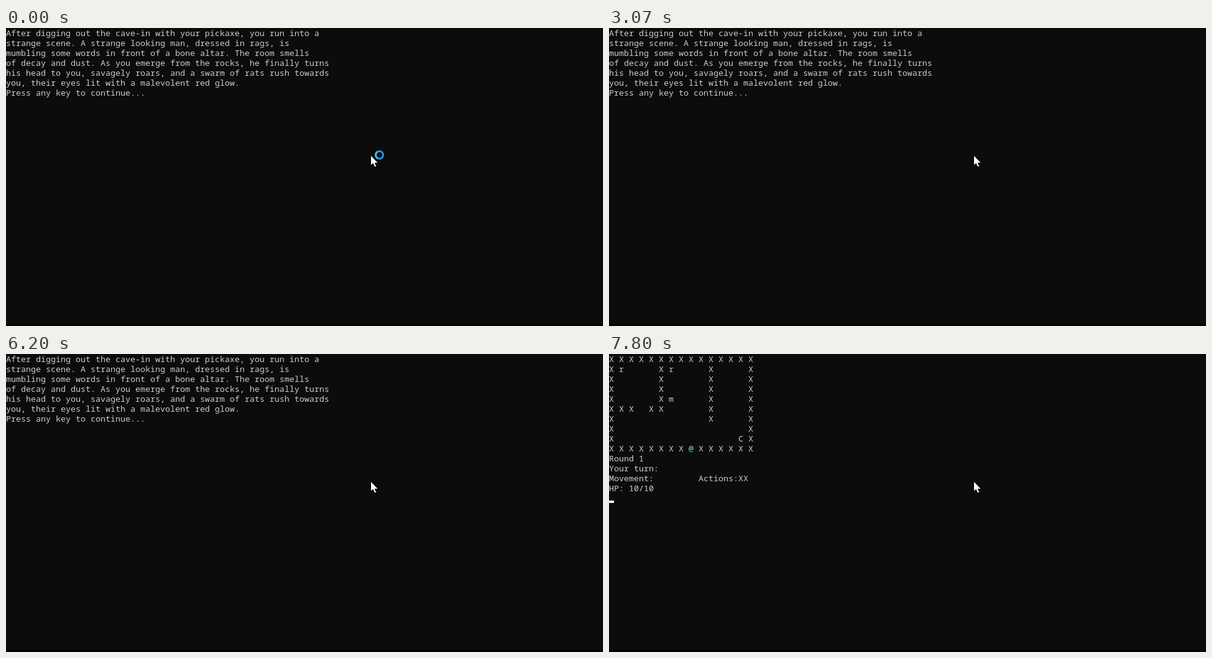
Animation of 960x480 px, one loop 8 s. Source, as an HTML page:

```html
<!DOCTYPE html>
<html lang="en">
<head>
<meta charset="utf-8">
<style>
  html, body { margin: 0; width: 100%; height: 100%; overflow: hidden; background: #0c0c0c; }
  pre {
    position: absolute; left: 0; top: 0; margin: 0; color: #ccc;
    font: 13.3333px/16px "Noto Sans Mono", "Liberation Mono", monospace;
    font-variant-ligatures: none;
  }
  .rat { color: #dcbf7c; }
  .hero { color: #7fdce0; }
  #caret { position: absolute; left: 0; width: 8px; height: 4px; background: #f2f2f2; }
  #edge { position: absolute; left: 0; top: 477px; width: 960px; height: 3px; background: #050104; }
  svg { position: absolute; left: 0; top: 0; }
</style>
</head>
<body>
<pre id="story">After digging out the cave-in with your pickaxe, you run into a
strange scene. A strange looking man, dressed in rags, is
mumbling some words in front of a bone altar. The room smells
of decay and dust. As you emerge from the rocks, he finally turns
his head to you, savagely roars, and a swarm of rats rush towards
you, their eyes lit with a malevolent red glow.
Press any key to continue...</pre>
<pre id="map">X X X X X X X X X X X X X X X
X <span class="rat">r</span>       X <span class="rat">r</span>       X       X
X         X         X       X
X         X         X       X
X         X m       X       X
X X X   X X         X       X
X                   X       X
X                           X
X                         C X
X X X X X X X X <span class="hero">@</span> X X X X X X
Round 1
Your turn:
Movement:         Actions:XX
HP: 10/10</pre>
<div id="caret"></div>
<div id="edge"></div>
<svg width="960" height="480">
  <path d="M587 206V220.5L590.3 217.4L592.8 223H595.2L592.7 217H597.5Z" fill="#fff"/>
  <g id="busy" fill="none" stroke-width="3">
    <circle cx="600.5" cy="204.5" r="6" stroke="#2b90e8"/>
    <path d="M597.5 209.7A6 6 0 0 1 597.5 199.3" stroke="#38bdf2"/>
  </g>
</svg>
<script>
  const LOOP = 8000, CLEAR = 6400, MAP = 6470;
  // The caret switches on and off alternately at these times.
  const blinks = [2530, 3070, 3600, 4130, 4670, 5200, 5730, 6200, MAP, 7270, 7800];
  const el = id => document.getElementById(id);
  const show = (id, on) => el(id).style.visibility = on ? "visible" : "hidden";
  const start = performance.now();

  function draw() {
    const t = (performance.now() - start) % LOOP;
    show("story", t < CLEAR);
    show("map", t >= MAP);
    show("caret", blinks.filter(b => b <= t).length % 2);
    el("caret").style.top = (t < MAP ? 124 : 236) + "px";
    show("busy", t < 200);
    el("busy").setAttribute("transform", `rotate(${t < 70 ? 0 : 30} 600.5 204.5)`);
    requestAnimationFrame(draw);
  }
  draw();
</script>
</body>
</html>
```
